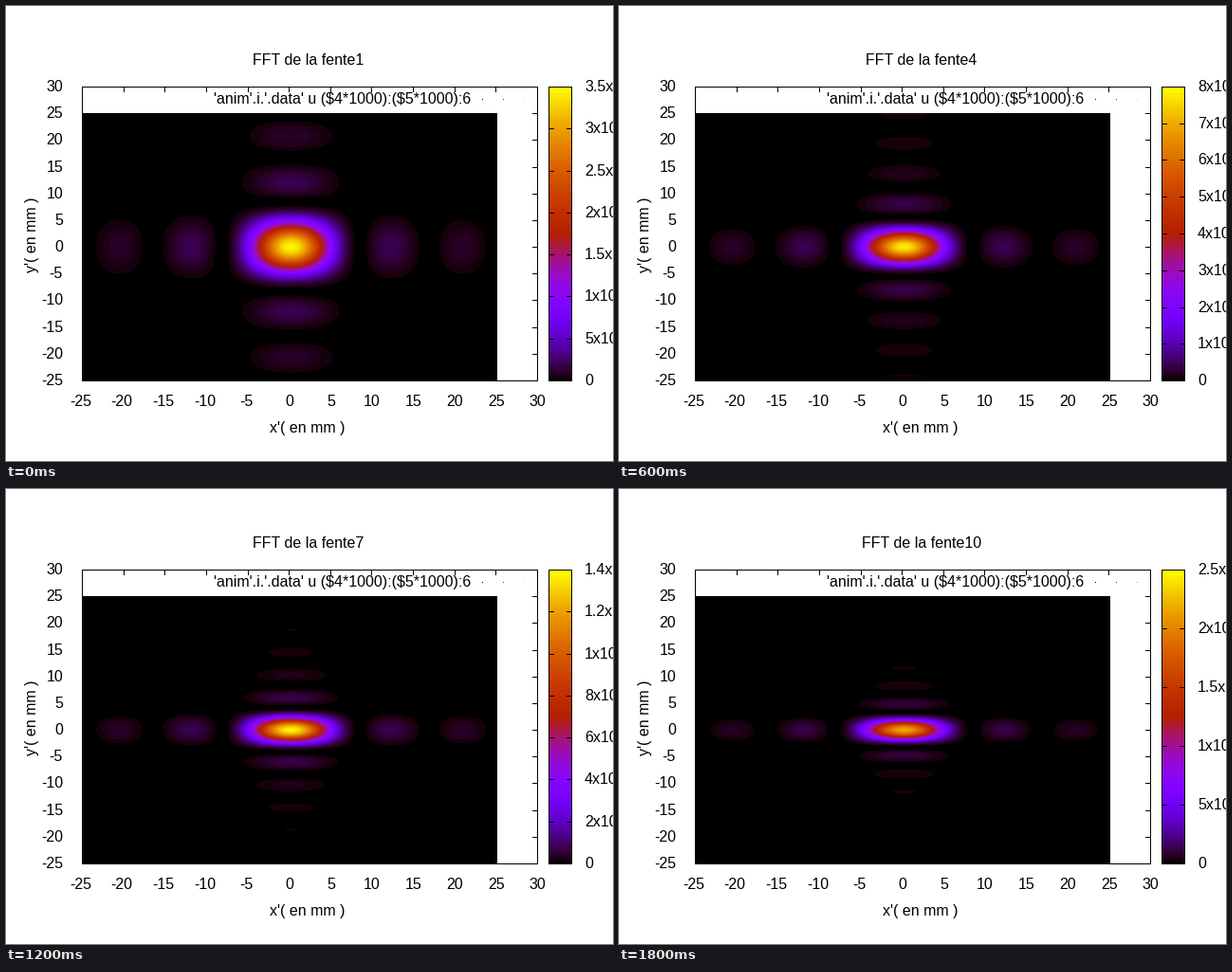
These frames come from a looping animation (640x480 px, 2000 ms). A matplotlib script:

```python
import math

import matplotlib.pyplot as plt
import numpy as np
from matplotlib.animation import FuncAnimation
from matplotlib.patches import Rectangle

W, H, DPI = 640, 480, 100
LEFT, RIGHT, TOP, BOTTOM = 80, 560, 85, 395
BAR_L, BAR_R = 572, 596
MAP_R, MAP_T, MAP_B = 518, 113, 392
LO, HI, STEP = -25, 30, 5
SX = (RIGHT - LEFT) / (HI - LO)
SY = (BOTTOM - TOP) / (HI - LO)
CENTRE = (300, 253.6)
PERIOD = 50        # mm between two diffraction orders
SLIT_W = 6         # slit width in samples; its height grows from 6 to 15
GAIN = 0.096       # peak intensity per squared slit height
LEVELS = 128
FRAMES, INTERVAL = 10, 200

plt.rcParams["font.family"] = "Liberation Sans"
fig = plt.figure(figsize=(W / DPI, H / DPI), dpi=DPI, facecolor="white")
ax = fig.add_axes([0, 0, 1, 1])
ax.axis("off")


def palette(gray):
    g = np.clip(np.floor(np.asarray(gray) * LEVELS) / (LEVELS - 1), 0, 1)
    blue = np.clip(np.sin(2 * np.pi * g), 0, 1)
    return np.stack([np.sqrt(g), g ** 3, blue], axis=-1)


def slit(pos, n):
    """Normalised diffraction intensity of n adjacent samples."""
    t = np.pi * pos / PERIOD
    s = np.sin(t)
    small = np.abs(s) < 1e-9
    ratio = np.sin(n * t) / (n * np.where(small, 1, s))
    return np.where(small, 1, ratio) ** 2


def scale(peak):
    """Tick step and rounded-up end of the colour axis."""
    power = 10 ** math.floor(math.log10(peak))
    room = 20 * power / peak
    step = power * (0.2 if room > 10 else 0.5 if room > 4 else 1)
    return step, math.ceil(peak / step) * step


def sci(v):
    if v == 0:
        return "0"
    return f"{v / 10 ** math.floor(math.log10(v) + 1e-9):.3g}x10"


def box(x, y, w, h, color="black", z=3):
    patch = Rectangle((x, y), w, h, facecolor=color, linewidth=0,
                      antialiased=False, zorder=z)
    return ax.add_patch(patch)


def frame(x0, x1):
    for y in (TOP, BOTTOM):
        box(x0, y, x1 - x0 + 1, 1)
    for x in (x0, x1):
        box(x, TOP, 1, BOTTOM - TOP + 1)


def label(x, y, s, ha="center", **kw):
    return ax.text(x, y, s, ha=ha, va="baseline", fontsize=16 * 72 / DPI,
                   color="black", parse_math=False, zorder=4, **kw)


def picture(x0, x1, y0, y1):
    blank = np.zeros((y1 - y0, x1 - x0, 3))
    return ax.imshow(blank, extent=(x0, x1, y1, y0), origin="upper",
                     interpolation="nearest", aspect="auto", zorder=1)


heat = picture(LEFT, MAP_R, MAP_T, BOTTOM)
bar = picture(BAR_L, BAR_R, TOP, BOTTOM)
ramp = (BOTTOM - np.arange(TOP, BOTTOM) - 0.5) / (BOTTOM - TOP)
bar.set_data(np.repeat(palette(ramp)[:, None], BAR_R - BAR_L, axis=1))
ax.set_xlim(0, W)
ax.set_ylim(H, 0)

frame(LEFT, RIGHT)
frame(BAR_L, BAR_R)
for v in range(LO, HI + 1, STEP):
    x = LEFT + (v - LO) * SX
    y = BOTTOM - (v - LO) * SY
    box(round(x), TOP, 1, 6)
    box(RIGHT - 5, round(y), 6, 1)
    label(x + (-1.5 if v < 0 else 0.5), 422, str(v))
    label(60, round(y) + 5, str(v), ha="right")

title = label(319, 62, "")
label(318, 450, "x'( en mm )")
label(32, 241, "y'( en mm )", rotation=90, rotation_mode="anchor")
label(490.5, 103, "'anim'.i.'.data' u ($4*1000):($5*1000):6", ha="right")
keys = [box(x, 98, 1, 1) for x in (502, 524, 546)]
ticks = [(box(BAR_L, 0, 6, 1), box(BAR_R - 5, 0, 6, 1),
          label(610, 0, "", ha="left")) for _ in range(11)]

xs = (np.arange(LEFT, MAP_R) - CENTRE[0]) / SX
rows = np.arange(MAP_T, BOTTOM)
ys = (CENTRE[1] - rows) / SY


def draw(i):
    n = SLIT_W + i
    peak = GAIN * n ** 2
    step, top = scale(peak)
    level = peak / top

    gray = level * np.outer(slit(ys, n), slit(xs, SLIT_W))
    gray[rows >= MAP_B] = 0
    heat.set_data(palette(gray))
    title.set_text(f"FFT de la fente{i + 1}")
    for k, dot in enumerate(keys):
        dot.set_facecolor(palette(level * k / 2))

    count = round(top / step)
    for k, parts in enumerate(ticks):
        y = round(BOTTOM - (BOTTOM - TOP) * k / count)
        for part in parts:
            part.set_visible(k <= count)
        parts[0].set_y(y)
        parts[1].set_y(y)
        parts[2].set_y(y + 5)
        parts[2].set_text(sci(k * step))
    return []


anim = FuncAnimation(fig, draw, frames=FRAMES, interval=INTERVAL,
                     init_func=lambda: draw(0), repeat=True, repeat_delay=0)
plt.show()
```
